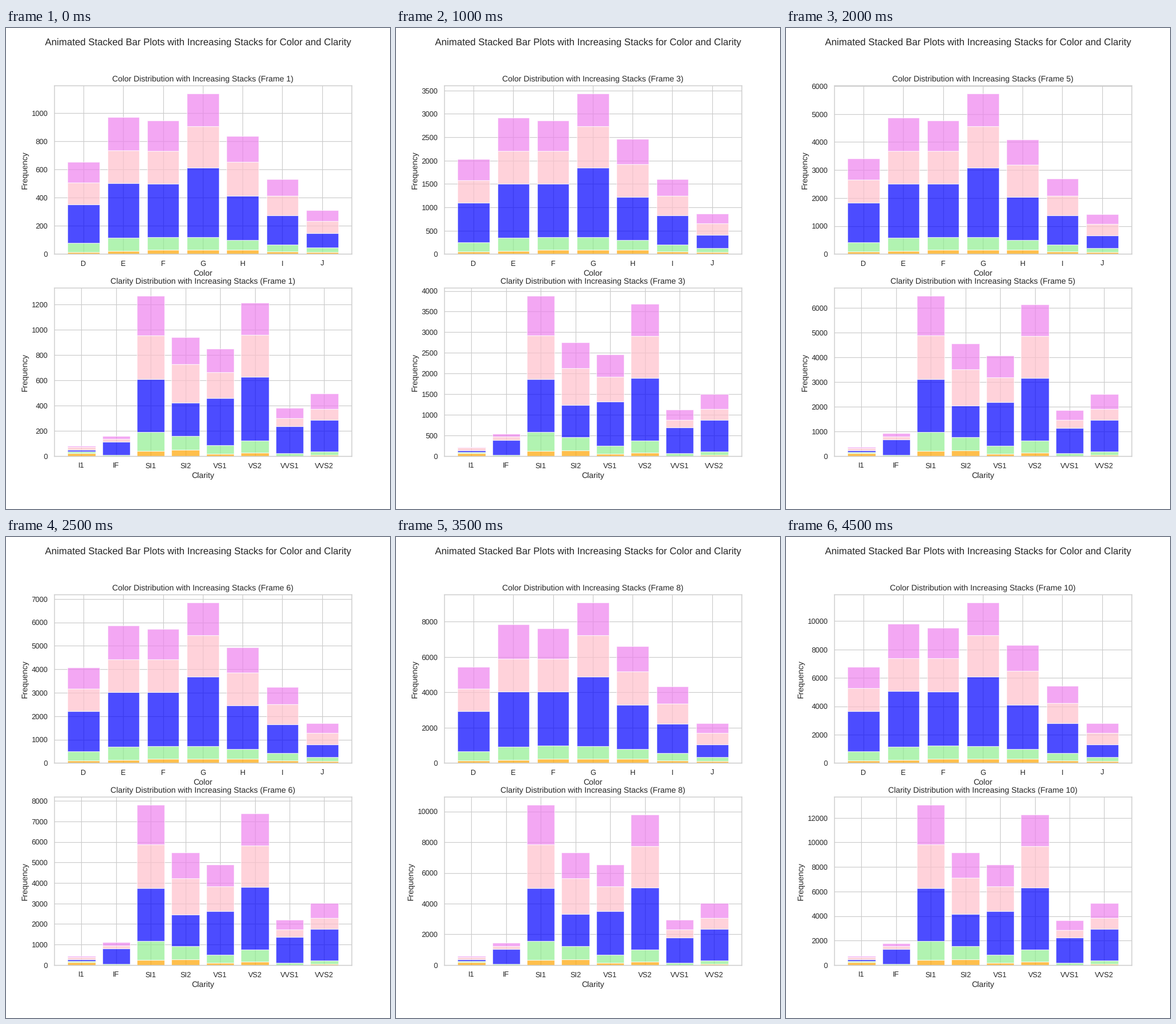
These frames come from a looping animation (669x837 px, 5 s). A matplotlib script:

```python
import matplotlib.pyplot as plt
import numpy as np
from matplotlib.animation import FuncAnimation

DPI = 669 / 8
STEPS = 10
GRAY, INK = "0.8", "0.15"
STACK_COLORS = ["orange", "lightgreen", "blue", "pink", "violet"]

plt.rcParams.update({
    "font.family": "Liberation Sans", "font.size": 12,
    "text.hinting": "none",
    "axes.titlesize": 12, "axes.labelsize": 12,
    "xtick.labelsize": 11, "ytick.labelsize": 11,
    "text.color": INK, "axes.labelcolor": INK,
    "xtick.color": INK, "ytick.color": INK,
    "axes.edgecolor": GRAY, "axes.linewidth": 1.25,
    "axes.axisbelow": True, "axes.grid": True,
    "grid.color": GRAY, "grid.linewidth": 1,
    "lines.solid_capstyle": "round",
    "xtick.bottom": False, "ytick.left": False,
    "xtick.major.size": 6, "ytick.major.size": 6,
})

# Per bar: its height at the first and the middle step, then its full stack
COLOR = {
    "D": (654, 3408, 163, 662, 2834, 1603, 1513),
    "E": (973, 4872, 224, 933, 3903, 2337, 2400),
    "F": (947, 4766, 312, 909, 3826, 2331, 2164),
    "G": (1138, 5725, 314, 871, 4884, 2924, 2299),
    "H": (837, 4093, 303, 702, 3115, 2360, 1824),
    "I": (531, 2686, 175, 522, 2093, 1428, 1204),
    "J": (311, 1415, 119, 307, 896, 808, 678),
}
CLARITY = {
    "I1": (82, 373, 210, 96, 146, 205, 84),
    "IF": (158, 938, 9, 71, 1212, 230, 268),
    "SI1": (1268, 6498, 408, 1560, 4282, 3575, 3240),
    "SI2": (940, 4562, 466, 1081, 2598, 2949, 2100),
    "VS1": (850, 4068, 170, 648, 3589, 1989, 1775),
    "VS2": (1215, 6157, 261, 978, 5071, 3357, 2591),
    "VVS1": (381, 1858, 17, 186, 2047, 616, 789),
    "VVS2": (493, 2516, 69, 286, 2606, 870, 1235),
}


def grow(bar, step):
    """Stack of one bar: fixed shares of a height that rises with the step."""
    first, middle, *stack = bar
    full = sum(stack)
    height = np.interp(step, [1, STEPS / 2, STEPS], [first, middle, full])
    return np.array(stack) * height / full


def draw(ax, name, bars, step):
    ax.clear()
    parts = np.array([grow(bar, step) for bar in bars.values()]).T
    bottoms = np.cumsum(parts, axis=0) - parts
    for part, bottom, color in zip(parts, bottoms, STACK_COLORS):
        ax.bar(list(bars), part, bottom=bottom, color=color,
               edgecolor="white", linewidth=1, alpha=0.7)
    ax.set_title(f"{name} Distribution with Increasing Stacks (Frame {step})")
    ax.set_xlabel(name)
    ax.set_ylabel("Frequency")


fig, (top, low) = plt.subplots(2, 1, figsize=(8, 10.009), dpi=DPI)
fig.subplots_adjust(left=0.125, right=0.9, bottom=0.11, top=0.88, hspace=0.2)
fig.suptitle("Animated Stacked Bar Plots with Increasing Stacks "
             "for Color and Clarity", fontsize=14.4, y=0.98)


def update(i):
    draw(top, "Color", COLOR, i + 1)
    draw(low, "Clarity", CLARITY, i + 1)
    return []


def reset():
    return update(0)


anim = FuncAnimation(fig, update, frames=STEPS, init_func=reset,
                     interval=500, repeat=True, repeat_delay=0, blit=False)
plt.show()
```
